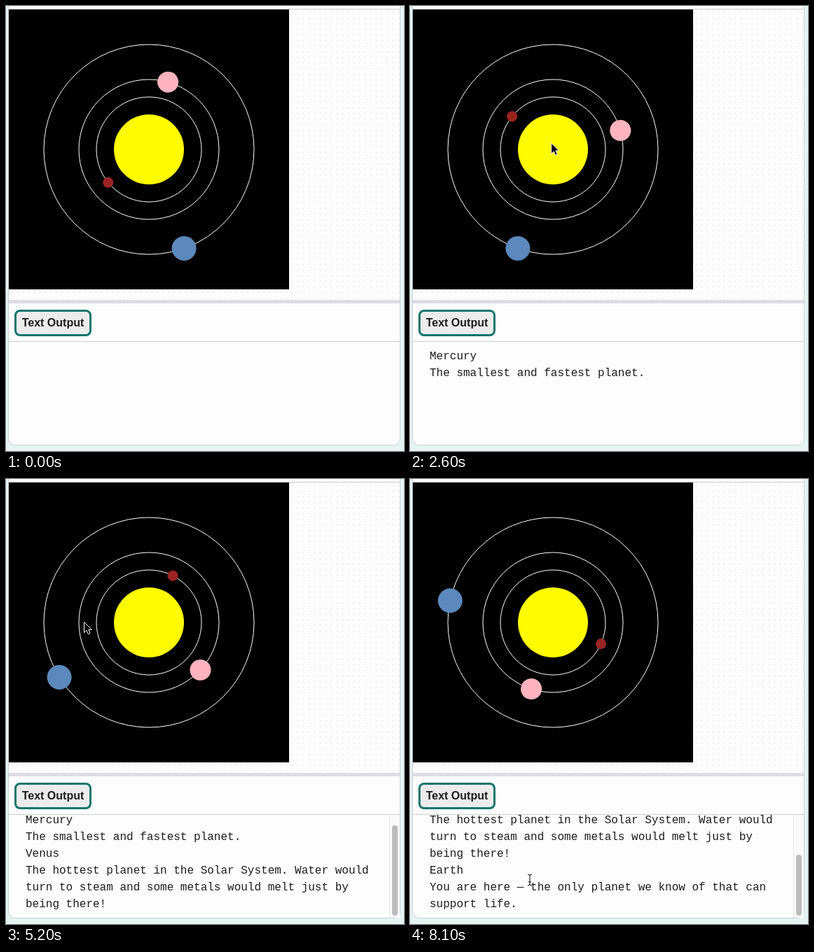
An HTML page that plays this animation: 568 px wide and 636 px high, repeating every 8.2 s.

```html
<!DOCTYPE html>
<html lang="en">
<head>
<meta charset="utf-8">
<title>Orbits</title>
<style>
  html, body { margin: 0; width: 100%; height: 100%; overflow: hidden; background: #e3f4f3; }
  svg { display: block; width: 100vw; height: 100vh; }
  .tab { font: bold 16px "Liberation Sans", Arial, sans-serif; }
  .log { font: 16px "Liberation Mono", "Courier New", monospace; }
  text { fill: #1c1c1c; white-space: pre; }
</style>
</head>
<body>
<svg viewBox="0 0 568 636">
  <defs>
    <pattern id="dots" x="4" y="5" width="8" height="8" patternUnits="userSpaceOnUse">
      <circle cx="4.5" cy="4.5" r=".9" fill="#e4e4e4"/>
    </pattern>
    <clipPath id="pane"><rect x="4" y="480" width="558" height="147"/></clipPath>
  </defs>

  <rect x="3.5" y="-20.5" width="559" height="648" rx="9" fill="#fdfdfd" stroke="#c9d0d0"/>
  <rect x="4" y="5" width="558" height="415" fill="url(#dots)"/>
  <path d="M4 4.5H562M4 479.5H562" stroke="#cdcdcd"/>
  <rect x="4" y="420" width="558" height="5" fill="#dddce4"/>
  <rect x="13.5" y="435.5" width="107" height="35" rx="6.5" fill="#ececec" stroke="#11756d" stroke-width="3"/>
  <text class="tab" x="67" y="458" text-anchor="middle">Text Output</text>

  <rect x="4" y="5" width="400" height="400"/>
  <g transform="translate(204 205)">
    <g fill="none" stroke="#fff">
      <circle r="75"/><circle r="100"/><circle r="150"/>
    </g>
    <circle r="50" fill="#fffb00"/>
    <g id="planets"></g>
  </g>

  <g clip-path="url(#pane)"><g id="log" class="log"></g></g>
  <g id="bar">
    <rect x="547" y="480" width="15" height="147" fill="#fafafa"/>
    <path d="M547.5 480V627" stroke="#e6e6e6"/>
    <rect id="thumb" x="551" width="8" rx="4" fill="#bcbcbc"/>
  </g>

  <path id="arrow" d="M.5 .5V15.6L4 12.3L6.3 17.7L9 16.5L6.8 11.3H11.4Z" fill="#000" stroke="#fff"/>
  <g id="beam" fill="none">
    <path id="stem" d="M-3-8Q0-8 0-6V6Q0 8-3 8M3-8Q0-8 0-6M0 6Q0 8 3 8M-2 3H2" stroke="#fff" stroke-width="2.6"/>
    <path d="M-3-8Q0-8 0-6V6Q0 8-3 8M3-8Q0-8 0-6M0 6Q0 8 3 8M-2 3H2" stroke="#000"/>
  </g>
</svg>
<script>
const LOOP = 8200, STEP = 100, PANE = 147, LINE = 24;
const $ = id => document.getElementById(id);

function add(parent, tag, attrs, text = "") {
  const el = document.createElementNS("http://www.w3.org/2000/svg", tag);
  for (const key in attrs) el.setAttribute(key, attrs[key]);
  el.textContent = text;
  return parent.appendChild(el);
}

// Orbit radius, planet radius, colour, degrees per step, angle offset
const planets = [
  [75, 7.5, "#9b2423", 3, 0],
  [100, 15, "#ffb3be", 2.25, 180],
  [150, 17.5, "#5b88bd", 1.5, 0],
].map(([orbit, r, fill, speed, offset]) =>
  ({ speed, offset, el: add($("planets"), "circle", { cx: orbit, r, fill }) }));

// Step at which each message is printed
const messages = [
  [20, "Mercury", "The smallest and fastest planet."],
  [37, "Venus", "The hottest planet in the Solar System. Water would",
    "turn to steam and some metals would melt just by", "being there!"],
  [66, "Earth", "You are here — the only planet we know of that can", "support life."],
];
const lines = messages.flatMap(([at, ...rows]) => rows.map(row => ({ at, row })))
  .map(({ at, row }, i) => ({ at, el: add($("log"), "text", { x: 28, y: 505 + i * LINE }, row) }));

// Pointer stops: step, x, y
const stops = [
  [3, 333, 20], [9, 150, 190], [14, 129, 183], [21, 129, 183],
  [32, 296, 212], [38, 296, 212], [43, 351, 127], [45, 351, 127],
  [52, 111, 204], [60, 57, 239], [67, 57, 239], [75, 168, 578], [79, 171, 573],
];

function pointerAt(n) {
  const i = stops.findIndex(s => s[0] > n);
  if (i < 0) return stops.at(-1).slice(1);
  const [t0, x0, y0] = stops[i - 1], [t1, x1, y1] = stops[i];
  const u = (n - t0) / (t1 - t0), e = u * u * (3 - 2 * u);
  return [x0 + (x1 - x0) * e, y0 + (y1 - y0) * e];
}

const show = (el, on) => el.setAttribute("visibility", on ? "visible" : "hidden");

function draw(n) {
  for (const { el, speed, offset } of planets)
    el.setAttribute("transform", `rotate(${offset + (n + 47) * speed})`);

  for (const { at, el } of lines) show(el, n >= at);
  const height = lines.filter(l => n >= l.at).length * LINE + 16;
  const scroll = Math.max(0, height - PANE);
  $("log").setAttribute("transform", `translate(0 ${-scroll})`);
  show($("bar"), scroll > 0);
  const size = Math.max(0, Math.round(PANE * Math.min(1, PANE / height)) - 6);
  $("thumb").setAttribute("height", size);
  $("thumb").setAttribute("y", 624 - size);

  const visible = n >= stops[0][0];
  const [x, y] = visible ? pointerAt(n) : [0, 0];
  const overText = y > 480;
  show($("arrow"), visible && !overText);
  show($("beam"), visible && overText);
  for (const id of ["arrow", "beam"])
    $(id).setAttribute("transform", `translate(${x} ${y})`);
}

const start = performance.now();
function tick() {
  draw(Math.floor((performance.now() - start) % LOOP / STEP));
  requestAnimationFrame(tick);
}
tick();
</script>
</body>
</html>
```
